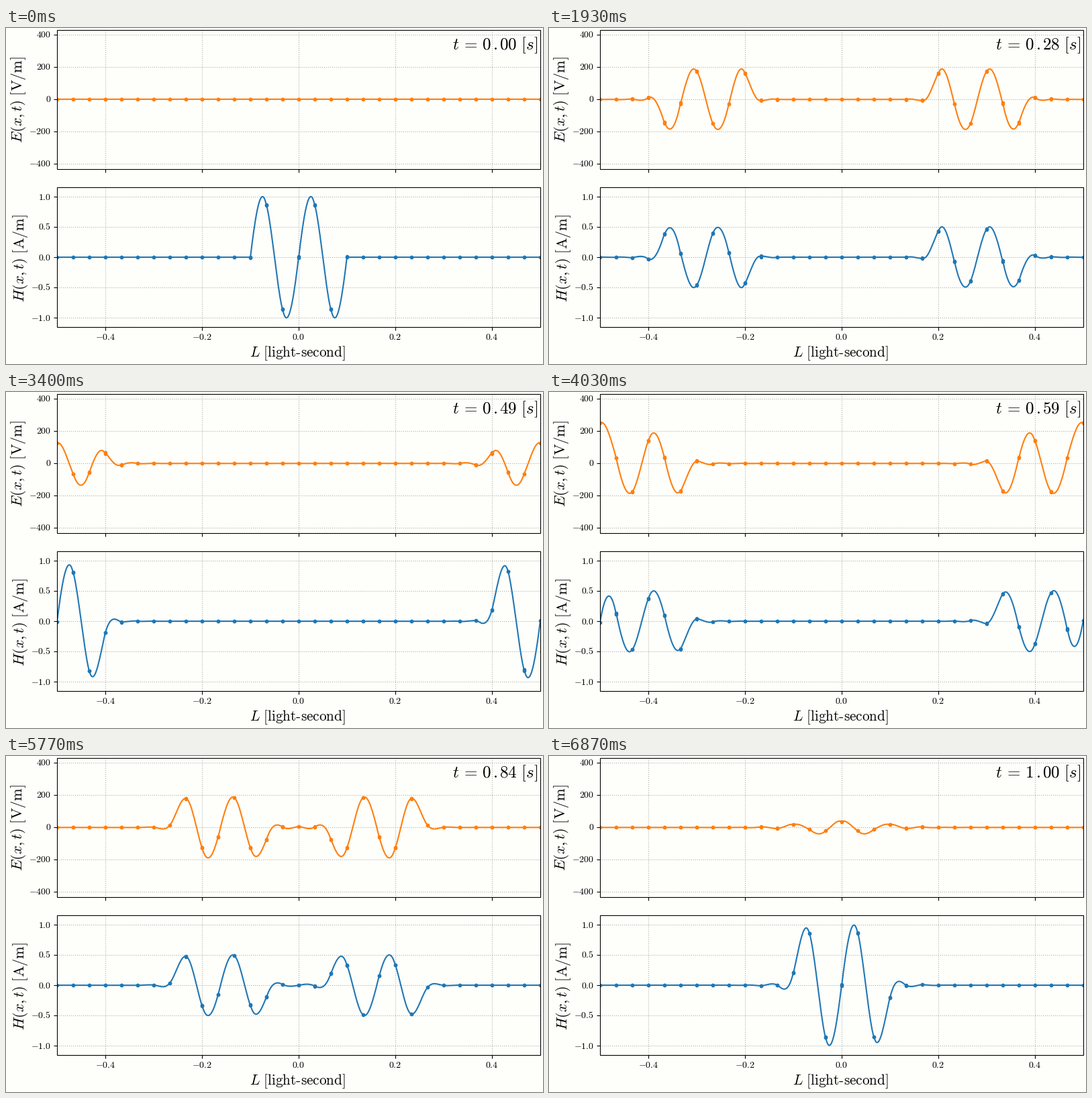
Write a matplotlib script that moves like this. It is 800x500 px and loops after 6910 ms.

```python
import numpy as np
import matplotlib.pyplot as plt
from matplotlib.animation import FuncAnimation
from matplotlib.patches import Rectangle
from numpy.polynomial.legendre import leggauss, legvander

plt.rcParams["mathtext.fontset"] = "cm"

W, H = 800, 500
LOOP, SLOTS = 6910, 414
STEP = LOOP / SLOTS
FPS, POSES = 30, 207
DT = 0.004846            # simulated seconds per pose
ETA = 376.73             # vacuum impedance
CELLS, ORDER = 30, 3
SIZE = 1 / CELLS

# --- Upwind discontinuous Galerkin advection of the right-going wave.
# The pulse is odd and H vanishes at both walls, so this wave is periodic
# and the left-going one is its negated mirror image.
m = np.arange(ORDER + 1)
gap = m[:, None] - m
stiff = np.where((gap > 0) & (gap % 2 == 1), 2.0, 0.0)
scale = ((2 * m + 1) / SIZE)[:, None]
own = scale * (stiff - 1)
inflow = scale * ((-1.0) ** m)[:, None] * np.ones(ORDER + 1)
upwind = np.roll(np.eye(CELLS), 1, axis=0)
rate = np.kron(np.eye(CELLS), own) + np.kron(upwind, inflow)


def propagator(a, terms=60):
    total = term = np.eye(len(a))
    for k in range(1, terms):
        term = term @ a / k
        total = total + term
    return total


centres = -0.5 + SIZE * (np.arange(CELLS) + 0.5)


def project(f):
    node, weight = leggauss(12)
    values = f(centres[:, None] + node * SIZE / 2)
    return (values * weight) @ legvander(node, ORDER) * (2 * m + 1) / 2


def pulse(x):
    return np.where(np.abs(x) < 0.1, np.sin(20 * np.pi * x), 0)


advance = propagator(rate * DT)
states = [0.5 * project(pulse).ravel()]
for _ in range(POSES - 1):
    states.append(advance @ states[-1])

local = np.linspace(-1, 1, 20)
basis = legvander(local, ORDER).T
xs = (centres[:, None] + local * SIZE / 2).ravel()
ends = np.sort(np.r_[0:len(xs):20, 19:len(xs):20])


def fields(n):
    right = (states[n].reshape(CELLS, -1) @ basis).ravel()
    left = -right[::-1]
    return ETA * (right - left), right + left


# --- Stage in pixel coordinates
fig = plt.figure(figsize=(W / 100, H / 100), dpi=100, facecolor="#fefefb")
ax = fig.add_axes([0, 0, 1, 1])
ax.set(xlim=(0, W), ylim=(H, 0))
ax.axis("off")

LEFT, RIGHT, TICK = 76, 796, 4.86
XTICKS = [-0.4, -0.2, 0.0, 0.2, 0.4]


def px(x):
    return 436 + 720 * x


def rule(x, y, **style):
    ax.plot(x, y, lw=0.8, solid_capstyle="butt", **style)


def label(x, y, s, size=10, **kw):
    kw = {"ha": "center", "va": "center", **kw}
    return ax.text(x, y, s, fontsize=size, color="black", **kw)


class Panel:
    def __init__(self, top, bottom, zero, unit, ticks, fmt, color):
        self.zero, self.unit = zero, unit
        frame = Rectangle((LEFT, top), RIGHT - LEFT, bottom - top,
                          fill=False, ec="black", lw=0.8, zorder=3)
        ax.add_patch(frame)
        grid = dict(color="#b0b0a8", ls=":", zorder=1)
        for v in XTICKS:
            x = round(px(v))
            rule([x, x], [top, bottom], **grid)
            rule([x, x], [bottom, bottom + TICK], color="black")
        for v in ticks:
            y = round(zero - unit * v)
            rule([LEFT, RIGHT], [y, y], **grid)
            rule([LEFT - TICK, LEFT], [y, y], color="black")
            label(67, y + 0.5, f"${v:{fmt}}$", ha="right")
        self.line, = ax.plot([], [], color=color, lw=1.5, zorder=2)
        self.dots, = ax.plot([], [], ".", color=color, ms=6, zorder=2.1)
        for part in (self.line, self.dots):
            part.set_clip_path(frame)

    def show(self, values):
        y = self.zero - self.unit * values
        self.line.set_data(px(xs), y)
        self.dots.set_data(px(xs[ends]), y[ends])


electric = Panel(3, 210, 106.3, 0.24, [-400, -200, 0, 200, 400], "d", "#ff7f0e")
magnetic = Panel(237, 445, 341.1, 90, [-1.0, -0.5, 0.0, 0.5, 1.0], ".1f", "#1f77b4")

for v in XTICKS:
    label(px(v), 460, f"${v:.1f}$")
label(434.5, 484.5, r"$L\ \text{[light-second]}$", 15.3)
label(18.5, 107, r"$E(x,t)\ \mathrm{[V/m]}$", 16, rotation=90)
label(21.5, 342.5, r"$H(x,t)\ \mathrm{[A/m]}$", 16, rotation=90)
clock = label(792.5, 26, "", 18, ha="right", zorder=4)


def clock_text(t):
    whole, part = f"{t:.2f}".split(".")
    # the point takes a full typewriter cell
    point = r"\hspace{0.14}\text{.}\hspace{0.14}"
    return rf"$t\,=\,\mathtt{{{whole}}}{point}\mathtt{{{part}}}\ [s]$"


def draw(slot):
    n = min(POSES - 1, int((slot + 1) * STEP * FPS / 1000))
    e, h = fields(n)
    electric.show(e)
    magnetic.show(h)
    clock.set_text(clock_text(n * DT))
    return electric.line, electric.dots, magnetic.line, magnetic.dots, clock


anim = FuncAnimation(fig, draw, frames=SLOTS, interval=STEP,
                     repeat=True, repeat_delay=0)
plt.show()
```
